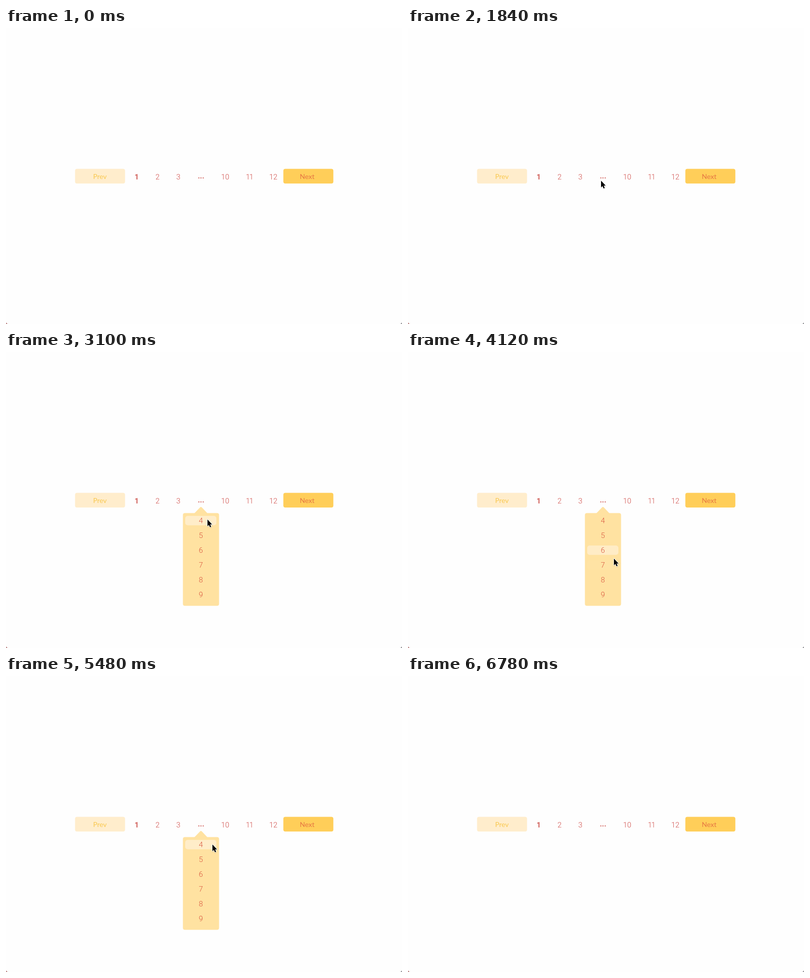
These frames come from a looping animation (800 by 600 pixels, 6.8 s). An HTML page:

```html
<!DOCTYPE html>
<html lang="en">
<head>
<meta charset="utf-8">
<title>Pagination</title>
<style>
  html, body { margin: 0; width: 100%; height: 100%; overflow: hidden; background: #fefefe; }
  svg { display: block; width: 100%; height: 100%; }
  text { font: 300 15px Roboto, "Open Sans", sans-serif; fill: #d0504c; text-anchor: middle; }
  .label { font: 400 14px Lato, sans-serif; }
  .bold { font-weight: 700; fill: #d0605a; }
  #menu text { fill: #d9563f; }
</style>
</head>
<body>
<svg viewBox="0 0 800 600">
  <path d="M0 596Q.5 599.5 4 600H0Z" fill="#a8605f"/>
  <path d="M800 596Q799.5 599.5 796 600H800Z" fill="#77777c"/>
  <rect x="139.5" y="285.5" width="101" height="29.7" rx="4" fill="#ffedcc"/>
  <rect x="560.3" y="285.5" width="101" height="29.7" rx="4" fill="#ffce59"/>
  <text class="label" x="189.7" y="306.3" style="fill:#f9c850">Prev</text>
  <text class="label" x="608.3" y="306.3" style="fill:#e67643">Next</text>
  <g id="pages"></g>
  <g id="menu">
    <path d="M380.5 327L391.5 315.6Q393.8 312.6 396.1 315.6L407 327Z" fill="#ffe2a1"/>
    <rect x="357.4" y="326.4" width="73" height="188" rx="4" fill="#ffe2a1"/>
  </g>
  <g id="cursor">
    <path id="arrow" d="M0 0V13.6L3 10.9 5.1 15.7 7.5 14.7 5.4 10.1H9.4Z" stroke="#fff" stroke-width="1.6" stroke-linejoin="round" paint-order="stroke"/>
  </g>
</svg>
<script>
const LOOP = 6800, OPEN = 2220, CLOSE = 5720, FADE = 300, HOVER = 150;
const ROW = 30, FIRST_ROW = 342;
const byId = id => document.getElementById(id);
const menu = byId('menu'), cursor = byId('cursor');

function add(parent, tag, attrs, content = '') {
  const el = document.createElementNS('http://www.w3.org/2000/svg', tag);
  for (const key in attrs) el.setAttribute(key, attrs[key]);
  el.textContent = content;
  return parent.appendChild(el);
}

['1', '2', '3', '...', '10', '11', '12'].forEach((label, i) => add(byId('pages'), 'text', {
  x: i < 3 ? 264 + 42.1 * i : 394 + 48.7 * (i - 3),
  y: label === '...' ? 305 : 306.5,
  class: i % 3 === 0 && i < 6 ? 'bold' : '',
  'letter-spacing': label === '11' ? -1.5 : 0
}, label));

const items = [4, 5, 6, 7, 8, 9].map((n, i) => {
  const y = FIRST_ROW + i * ROW;
  const glow = add(menu, 'rect', { x: 362, y: y - 9.7, width: 63, height: 19, rx: 5, fill: '#ffedc9' });
  add(menu, 'text', { x: 393.6, y: y + 5.4 }, n);
  return { y, glow };
});

// Key points of the pointer tip: time, x, y
const path = [
  [660, 860, 425], [760, 565, 492], [840, 470, 502],                    // enter
  [1400, 394, 353], [1800, 390, 309], [2600, 390, 309],                 // rest on the dots
  [3100, 407, 339], [3500, 408, 341], [4120, 416, 418], [4550, 419, 492], // down the list
  [5250, 417, 341], [5520, 417, 341], [5700, 409, 278], [6140, 659, -22]  // back up and out
];
const last = path.length - 1;

const slope = (i, axis) => (path[i + 1][axis] - path[i][axis]) / (path[i + 1][0] - path[i][0]);

function tangent(i, axis) {
  if (i === 0) return slope(0, axis);
  if (i === last) return slope(last - 1, axis);
  const a = slope(i - 1, axis), b = slope(i, axis);
  return a * b > 0 ? 2 * a * b / (a + b) : 0;
}

// Monotone cubic, so the pointer never overshoots its stops
function pointer(t, axis) {
  if (t <= path[0][0]) return path[0][axis];
  if (t >= path[last][0]) return path[last][axis];
  const i = path.findIndex(p => p[0] > t) - 1;
  const span = path[i + 1][0] - path[i][0];
  const u = (t - path[i][0]) / span, v = 1 - u;
  return v * v * (1 + 2 * u) * path[i][axis] + u * u * (3 - 2 * u) * path[i + 1][axis]
    + span * u * v * (v * tangent(i, axis) - u * tangent(i + 1, axis));
}

const ease = u => {
  const k = Math.min(1, Math.max(0, u));
  return k * k * (3 - 2 * k);
};

// Share of the last moments the pointer spent over a row
function hoverAmount(t, y) {
  const steps = 15;
  let hits = 0;
  for (let k = 0; k < steps; k++) {
    if (Math.abs(pointer(t - k * HOVER / steps, 2) - y) < ROW / 2) hits++;
  }
  return hits / steps;
}

function render(t) {
  const shown = ease((t - OPEN) / FADE) - ease((t - CLOSE) / FADE);
  menu.setAttribute('opacity', shown);
  menu.setAttribute('transform', `translate(0 ${16 * (1 - shown)})`);
  for (const { y, glow } of items) glow.setAttribute('opacity', hoverAmount(t, y));
  cursor.setAttribute('transform', `translate(${pointer(t, 1)} ${pointer(t, 2) + .5})`);
}

const shadow = byId('arrow').cloneNode();
shadow.removeAttribute('id');
shadow.setAttribute('stroke', '#000');
shadow.setAttribute('opacity', .1);
shadow.setAttribute('transform', 'translate(.3 1.4)');
cursor.prepend(shadow);

const start = performance.now();
function tick() {
  render((performance.now() - start) % LOOP);
  requestAnimationFrame(tick);
}
tick();
</script>
</body>
</html>
```
